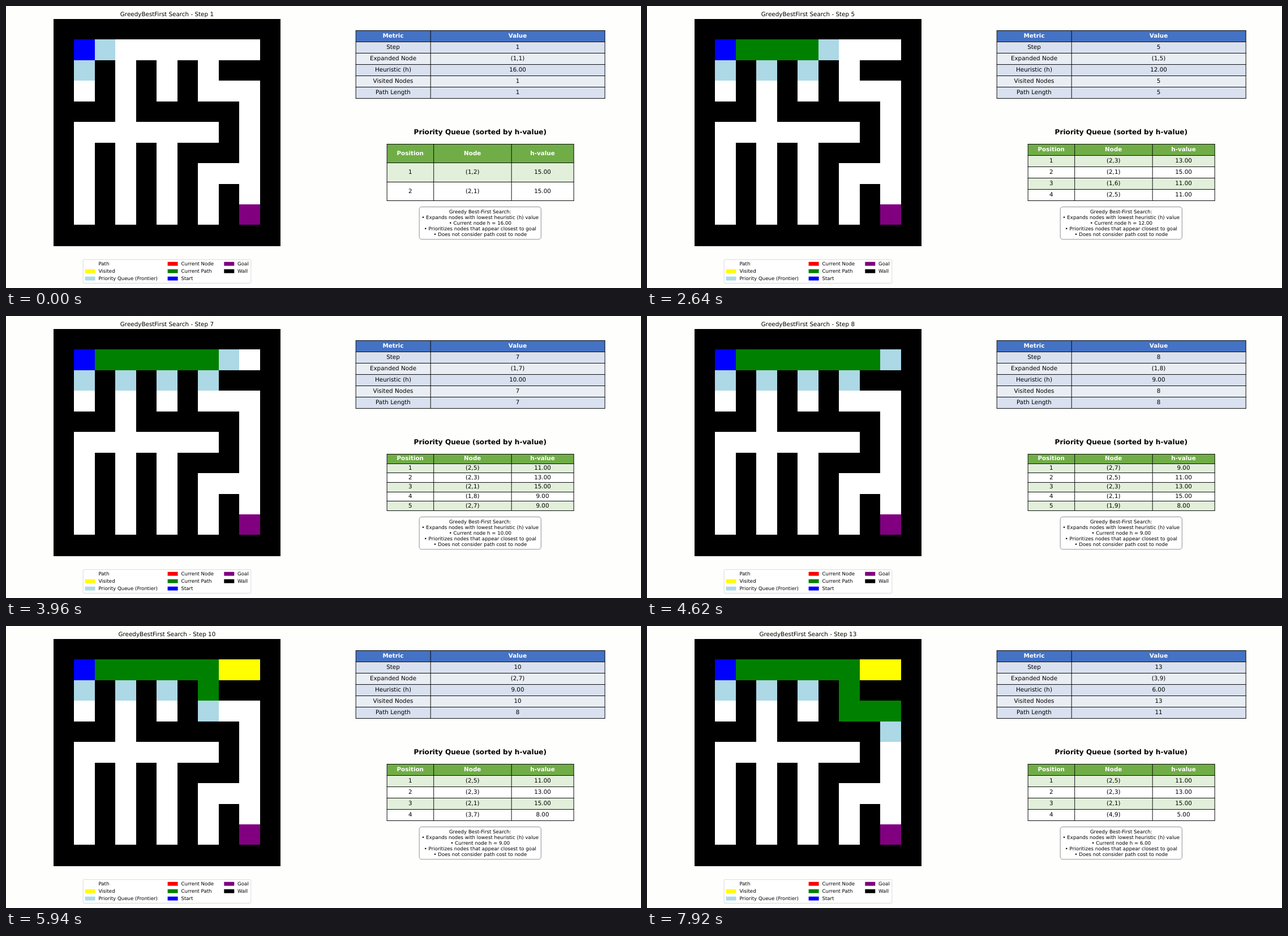
Write an HTML page with a canvas that moves like this. It is 1122 px wide and 499 px high and loops after 8 s.

```html
<!DOCTYPE html>
<html lang="en">
<head>
<meta charset="utf-8">
<title>Greedy best-first search</title>
<style>
html, body { margin: 0; width: 100%; height: 100%; overflow: hidden; background: #fefefd; }
canvas { display: block; }
</style>
</head>
<body>
<canvas id="stage" width="1122" height="499"></canvas>
<script>
const ctx = document.getElementById('stage').getContext('2d');
const LOOP = 8000, STEP_MS = 660, GOAL = 9;
const PT = 0.8657; // pixels per point
const MAZE = [
  '###########',
  '#.........#',
  '#.#.#.#.###',
  '#.#.#.#...#',
  '###.#####.#',
  '#.......#.#',
  '#.#.#.###.#',
  '#.#.#.#...#',
  '#.#.#.#.#.#',
  '#.#.#.#.#.#',
  '###########'
];
const COLOR = {
  path: '#fff', visited: '#ff0', frontier: '#add8e6', current: '#f00',
  route: '#008000', start: '#00f', goal: '#800080', wall: '#000'
};

// Search: the queue is sorted before each pop, new nodes go to its end.
function search(count) {
  const node = (r, c, parent) => ({ r, c, parent, h: GOAL - r + GOAL - c });
  const seen = new Set(['1,1']);
  const visited = [], steps = [];
  let queue = [node(1, 1, null)];
  while (steps.length < count) {
    queue.sort((a, b) => a.h - b.h);
    const cur = queue.shift();
    visited.push(cur);
    for (const [dr, dc] of [[0, 1], [1, 0], [0, -1], [-1, 0]]) {
      const r = cur.r + dr, c = cur.c + dc, key = r + ',' + c;
      if (MAZE[r][c] === '#' || seen.has(key)) continue;
      seen.add(key);
      queue.push(node(r, c, cur));
    }
    const route = [];
    for (let n = cur; n; n = n.parent) route.push(n);
    steps.push({ cur, route, visited: visited.slice(), queue: queue.slice() });
  }
  return steps;
}
const steps = search(Math.ceil(LOOP / STEP_MS));

function text(str, x, y, pt, { bold = false, color = '#000', align = 'center' } = {}) {
  ctx.font = `${bold ? 'bold ' : ''}${pt * PT}px "DejaVu Sans", sans-serif`;
  ctx.textAlign = align;
  ctx.fillStyle = color;
  ctx.fillText(str, x, y);
}

function roundBox(x, y, w, h, r, stroke) {
  ctx.beginPath();
  ctx.roundRect(x, y, w, h, r);
  ctx.fillStyle = '#fff';
  ctx.fill();
  ctx.strokeStyle = stroke;
  ctx.lineWidth = PT;
  ctx.stroke();
}

const gridX = c => Math.round(84 + 36.45 * c);
const gridY = r => r > 10 ? 425 : Math.round(22.9 + 36.45 * r);

function cell(r, c, color) {
  const x = gridX(c), y = gridY(r);
  ctx.fillStyle = color;
  ctx.fillRect(x, y, gridX(c + 1) - x, gridY(r + 1) - y);
}

function drawMaze(s) {
  MAZE.forEach((row, r) => [...row].forEach((ch, c) =>
    cell(r, c, ch === '#' ? COLOR.wall : COLOR.path)));
  const paint = (nodes, color) => nodes.forEach(n => cell(n.r, n.c, color));
  paint(s.visited, COLOR.visited);
  paint(s.queue, COLOR.frontier);
  paint(s.route, COLOR.route);
  cell(1, 1, COLOR.start);
  cell(GOAL, GOAL, COLOR.goal);
}

function drawTable(xs, top, bottom, rows, headColor, fills) {
  const rowH = (bottom - top) / rows.length;
  const last = xs[xs.length - 1];
  rows.forEach((row, i) => {
    const y = top + i * rowH;
    ctx.fillStyle = i ? fills[(i - 1) % 2] : headColor;
    ctx.fillRect(xs[0], y, last - xs[0], rowH);
    row.forEach((str, j) => text(str, (xs[j] + xs[j + 1]) / 2 - 0.2, y + rowH / 2 + 2.6, 12,
      i ? {} : { bold: true, color: '#fff' }));
  });
  ctx.strokeStyle = '#000';
  ctx.lineWidth = 0.95;
  ctx.beginPath();
  for (let i = 0; i <= rows.length; i++) {
    const y = Math.floor(top + i * rowH) + 0.5;
    ctx.moveTo(xs[0] - 0.4, y);
    ctx.lineTo(last + 0.4, y);
  }
  for (const x of xs) {
    ctx.moveTo(x, top);
    ctx.lineTo(x, bottom);
  }
  ctx.stroke();
}

function drawLegend() {
  roundBox(136.2, 448.7, 296.6, 41.8, 1.8, '#d6d6d6');
  const columns = [
    [140, [['Path', 'path'], ['Visited', 'visited'], ['Priority Queue (Frontier)', 'frontier']]],
    [286, [['Current Node', 'current'], ['Current Path', 'route'], ['Start', 'start']]],
    [385.7, [['Goal', 'goal'], ['Wall', 'wall']]]
  ];
  for (const [x, items] of columns) {
    items.forEach(([label, key], i) => {
      const y = 459.3 + 13 * i;
      ctx.fillStyle = COLOR[key];
      ctx.fillRect(x - 0.4, y - 6.5, 18, 6.9);
      text(label, x + 23.4, y, 10, { align: 'left' });
    });
  }
}

function drawInfo(h) {
  roundBox(730.2, 355.5, 215.2, 57.4, 4.3, '#7f7f7f');
  [
    'Greedy Best-First Search:',
    '• Expands nodes with lowest heuristic (h) value',
    `• Current node h = ${h}`,
    '• Prioritizes nodes that appear closest to goal',
    '• Does not consider path cost to node'
  ].forEach((line, i) => text(line, 837.8, 367 + 10.05 * i, 10));
}

function draw(i) {
  const s = steps[i];
  const name = n => `(${n.r},${n.c})`;
  const h = s.cur.h.toFixed(2);
  ctx.fillStyle = '#fefefd';
  ctx.fillRect(0, 0, 1122, 499);
  text(`GreedyBestFirst Search - Step ${i + 1}`, 284.4, 17.9, 12);
  drawMaze(s);
  drawLegend();
  drawTable([618.2, 750.2, 1058.2], 43.4, 163.7, [
    ['Metric', 'Value'],
    ['Step', i + 1],
    ['Expanded Node', name(s.cur)],
    ['Heuristic (h)', h],
    ['Visited Nodes', s.visited.length],
    ['Path Length', s.route.length]
  ], '#4472c4', ['#d9e1f0', '#e9edf4']);
  text('Priority Queue (sorted by h-value)', 837.8, 227, 14, { bold: true });
  drawTable([673.2, 755.7, 893.2, 1003.2], 244.3, 344.7, [
    ['Position', 'Node', 'h-value'],
    ...s.queue.map((n, k) => [k + 1, name(n), n.h.toFixed(2)])
  ], '#70ad47', ['#e2efda', '#fff']);
  drawInfo(h);
}

ctx.textRendering = 'geometricPrecision';
const t0 = performance.now();
let shown = -1;
function tick() {
  const i = Math.floor((performance.now() - t0) % LOOP / STEP_MS);
  if (i !== shown) draw(shown = i);
  requestAnimationFrame(tick);
}
tick();
</script>
</body>
</html>
```
